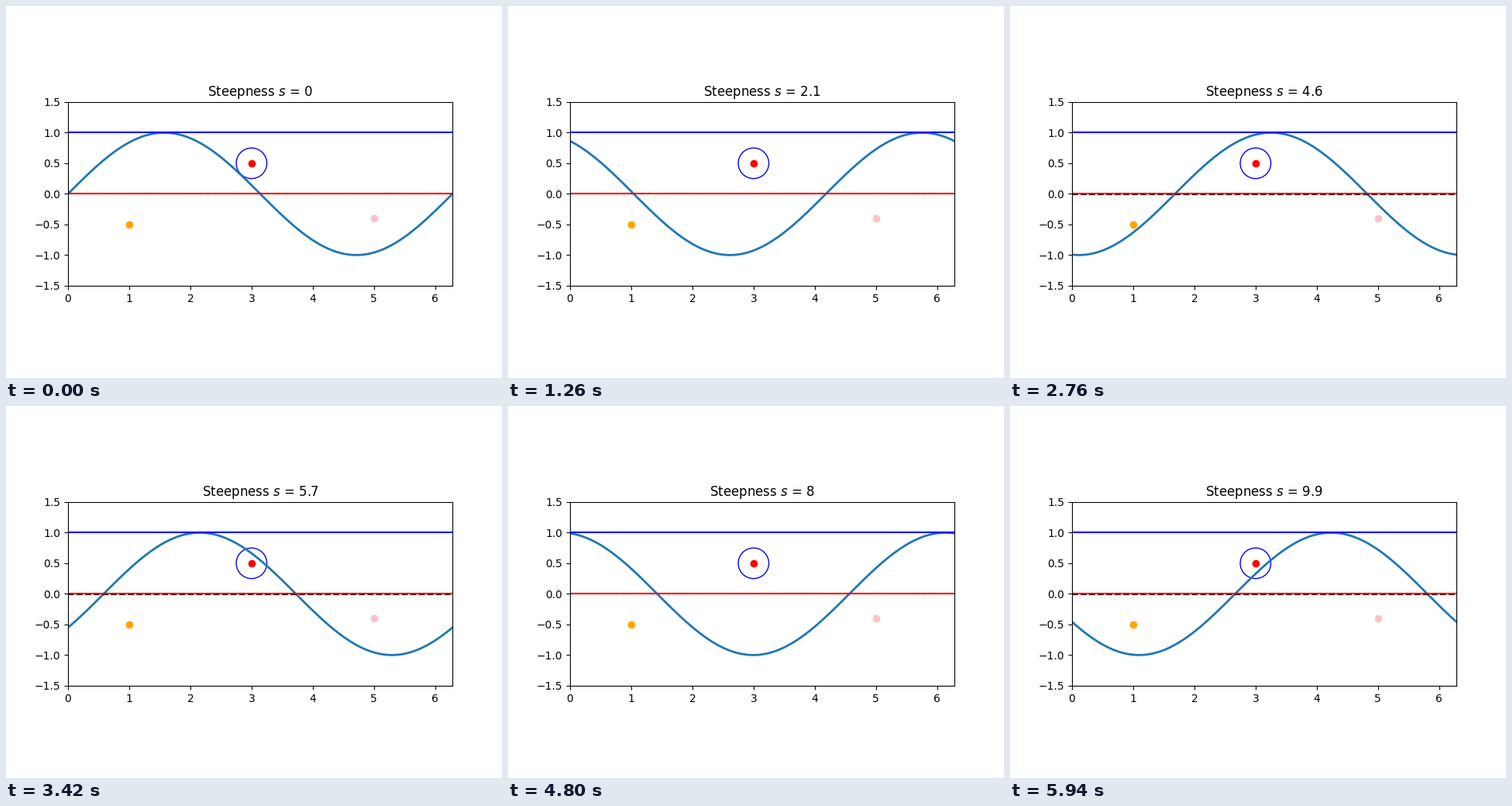
These frames come from a looping animation (640x480 px, 6000 ms). A matplotlib script:

```python
import numpy as np
import matplotlib.pyplot as plt
from matplotlib.animation import FuncAnimation

FRAMES = 100
INTERVAL = 60

fig, ax = plt.subplots(figsize=(6.4, 4.8), dpi=100)
ax.set_aspect("equal")
ax.set_xlim(0, 2 * np.pi)
ax.set_ylim(-1.5, 1.5)

x = np.linspace(0, 2 * np.pi, 100)
wave, = ax.plot(x, np.sin(x), lw=2)
mean_line = ax.axhline(0, color="black", ls="--")
ax.axhline(0, color="red")
ax.axhline(1, color="blue")

ax.add_patch(plt.Circle((3, 0.5), 0.25, color="blue", fill=False))
for px, py, color in [(3, 0.5, "red"), (1, -0.5, "orange"), (5, -0.4, "pink")]:
    ax.plot(px, py, "o", color=color)

title = ax.set_title("Steepness $s$ = 0")


def update(i):
    s = i / 10
    y = np.sin(x + s)
    wave.set_ydata(y)
    # Both endpoints are sampled, so the mean drifts slightly around zero.
    mean_line.set_ydata([y.mean()] * 2)
    title.set_text(f"Steepness $s$ = {s:g}")
    return wave, mean_line, title


anim = FuncAnimation(fig, update, frames=FRAMES, interval=INTERVAL,
                     repeat=True, repeat_delay=0)
plt.show()
```
